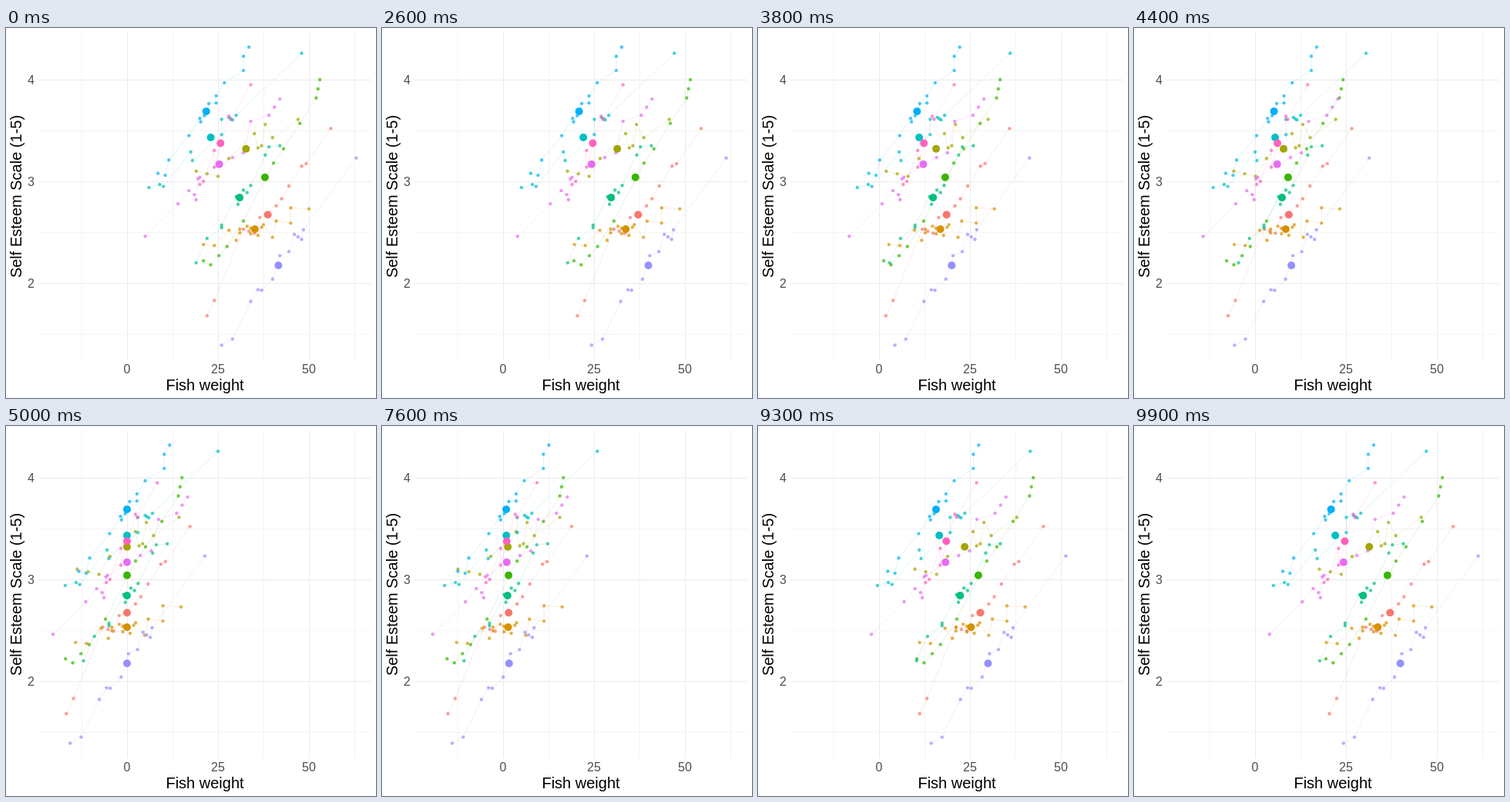
Animation of 480 by 480 pixels, one loop 10 s. Source, as an HTML page with a canvas:

```html
<!DOCTYPE html>
<html lang="en">
<head>
<meta charset="utf-8">
<title>Centering within groups</title>
<style>
  html, body { margin: 0; width: 100%; height: 100%; overflow: hidden; background: #fff; }
  canvas { display: block; width: 480px; height: 480px; }
</style>
</head>
<body>
<canvas id="chart" width="480" height="480"></canvas>
<script>
const ctx = document.getElementById('chart').getContext('2d');
const FONT = '"Liberation Sans", Arial, sans-serif';
const PANEL = { left: 42, right: 474, top: 6, bottom: 431 };
const UNIT_X = 4.72;
const toX = weight => 157 + weight * UNIT_X;
const toY = score => 199 - (score - 3) * 132;

// Each run lists a few anchors (weight, score x 100); a dot also sits midway along every link.
const groups = [
  ['#F8766D', [48, 315, 41, 276, 32, 253, 35, 249], [42.5, 283, 56, 352], [22, 168], [24, 183]],
  ['#D89000', [36, 247, 24, 237, 50, 273, 40, 245, 28, 252, 34, 254, 41, 261, 21, 238, 45, 274]],
  ['#A3A500', [47, 361, 25, 305, 19, 310, 37, 335], [35, 347], [38, 356], [40, 343]],
  ['#39B600', [43, 332, 52, 382, 53, 400, 27.5, 236, 23, 218], [21, 222], [32, 261]],
  ['#00BF7D', [33, 289, 19, 220, 42, 335, 26, 257, 38, 326, 22, 244], [39, 334]],
  ['#00BFC4', [26, 346, 10, 295, 48, 426, 9, 297, 26, 361, 30, 365], [6, 294]],
  ['#00B0F6', [8.5, 308, 32, 409, 17, 345, 32, 423, 10.5, 306], [11.5, 321, 33.5, 432, 20, 362]],
  ['#9590FF', [40, 204, 34, 182, 63, 323, 26, 139, 46, 248, 48, 243], [29, 145], [42, 227]],
  ['#E76BF3', [32, 328, 5, 246, 34, 359], [42, 381, 39, 365, 19, 282], [14, 278, 20, 304]],
  ['#FF62BC', [20, 297, 28, 364, 24, 314], [21, 300], [28.5, 361], [34, 395]]
].map(([color, ...runs]) => {
  const dots = runs.flatMap(expandRun).sort((a, b) => a.x - b.x);
  return { color, dots, mean: { x: average(dots, 'x'), y: average(dots, 'y') } };
});

function expandRun(run) {
  const dots = [];
  for (let i = 0; i < run.length; i += 2) {
    const x = run[i], y = run[i + 1] / 100;
    if (i) {
      const last = dots[dots.length - 1];
      dots.push({ x: (last.x + x) / 2, y: (last.y + y) / 2 });
    }
    dots.push({ x, y });
  }
  return dots;
}

function average(dots, key) {
  return dots.reduce((sum, dot) => sum + dot[key], 0) / dots.length;
}

function line(x1, y1, x2, y2, width) {
  ctx.lineWidth = width;
  ctx.beginPath();
  ctx.moveTo(x1, y1);
  ctx.lineTo(x2, y2);
  ctx.stroke();
}

function disc(x, y, radius) {
  ctx.beginPath();
  ctx.arc(x, y, radius, 0, Math.PI * 2);
  ctx.fill();
}

function text(label, x, y, size, color, align) {
  ctx.font = `${size}px ${FONT}`;
  ctx.fillStyle = color;
  ctx.textAlign = align;
  ctx.fillText(label, x, y);
}

function drawAxes() {
  ctx.strokeStyle = '#ebebeb';
  for (let i = -1; i <= 5; i++) {
    const x = toX(i * 12.5) + 0.5;
    line(x, PANEL.top, x, PANEL.bottom, i % 2 ? 0.55 : 1.07);
  }
  for (let i = 3; i <= 8; i++) {
    const y = toY(i / 2) + 0.5;
    line(PANEL.left, y, PANEL.right, y, i % 2 ? 0.55 : 1.07);
  }
  for (const tick of [0, 25, 50]) text(tick, toX(tick), 448, 16, '#4d4d4d', 'center');
  for (const tick of [2, 3, 4]) text(tick, 37, toY(tick) + 6, 16, '#4d4d4d', 'right');
  text('Fish weight', 258, 470, 20, '#000', 'center');
  ctx.save();
  ctx.translate(20, 218.5);
  ctx.rotate(-Math.PI / 2);
  text('Self Esteem Scale (1-5)', 0, 0, 20, '#000', 'center');
  ctx.restore();
}

// Share of the group mean still present: 1 is raw data, 0 is fully centered.
function meanShare(time) {
  const step = Math.floor(time / 100) % 100;
  if (step <= 50) return Math.min(1, (50 - step) / 25);
  return Math.max(0, (step - 75) / 25);
}

function draw(time) {
  const share = meanShare(time);
  const place = (group, dot) => [toX(dot.x - group.mean.x * (1 - share)), toY(dot.y)];
  ctx.fillStyle = '#fff';
  ctx.fillRect(0, 0, 480, 480);
  drawAxes();

  ctx.globalAlpha = 0.15;
  ctx.lineWidth = 1;
  for (const group of groups) {
    ctx.strokeStyle = group.color;
    ctx.beginPath();
    group.dots.forEach(dot => ctx.lineTo(...place(group, dot)));
    ctx.stroke();
  }

  ctx.globalAlpha = 0.7;
  for (const group of groups) {
    ctx.fillStyle = group.color;
    group.dots.forEach(dot => disc(...place(group, dot), 2.2));
  }

  ctx.globalAlpha = 1;
  for (const group of groups) {
    ctx.fillStyle = group.color;
    disc(...place(group, group.mean), 5);
  }
}

let start;
function tick(now) {
  start ??= now;
  draw(now - start);
  requestAnimationFrame(tick);
}
draw(0);
requestAnimationFrame(tick);
</script>
</body>
</html>
```
